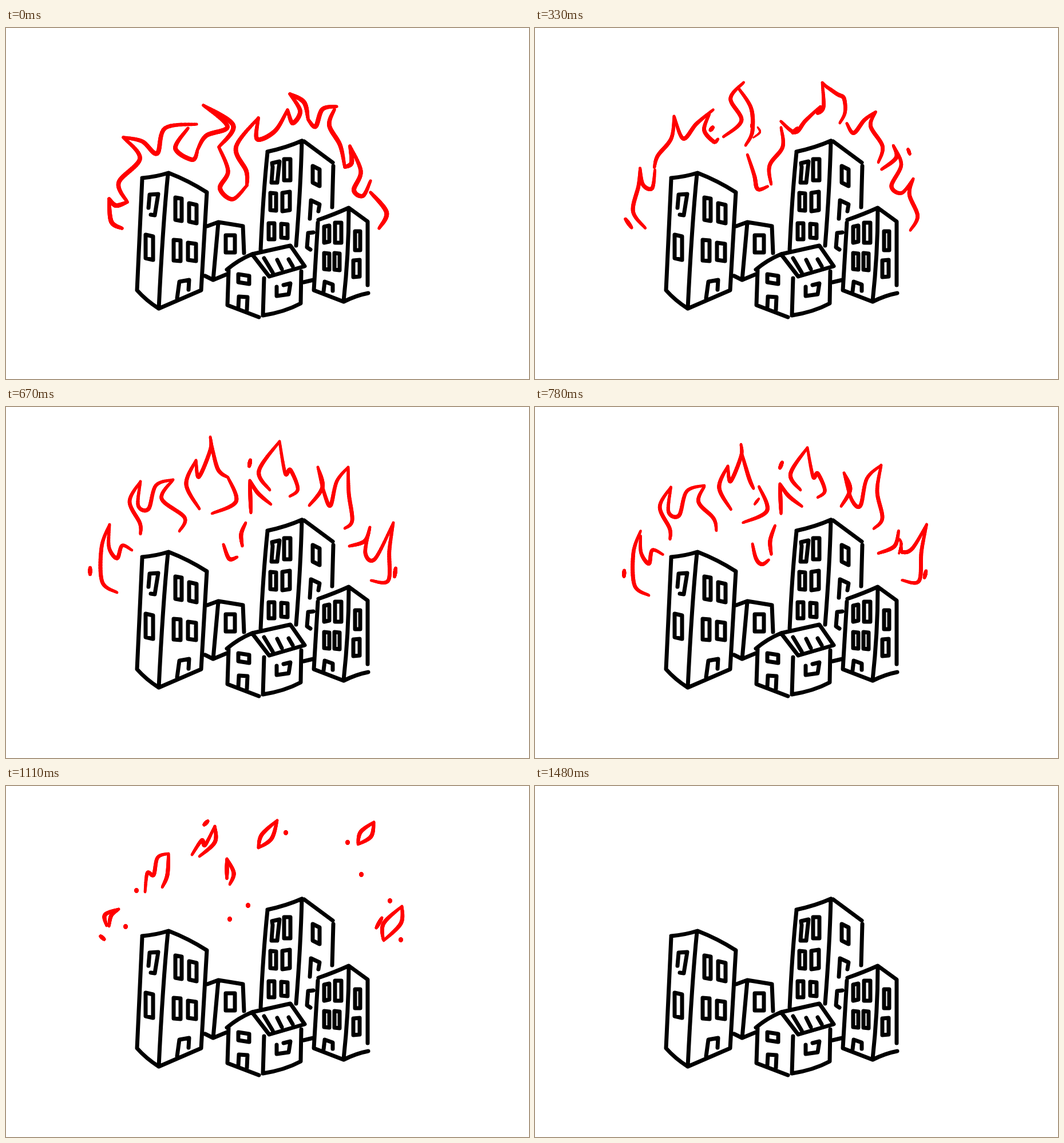
These frames come from a looping animation (914x613 px, 1970 ms). An HTML page with a canvas:

```html
<!DOCTYPE html>
<html lang="en">
<head>
<meta charset="utf-8">
<title>Burning city</title>
<style>
html, body { margin: 0; width: 100%; height: 100%; overflow: hidden; background: #fff; }
canvas { display: block; }
</style>
</head>
<body>
<canvas id="stage" width="914" height="613"></canvas>
<script>
const ctx = document.getElementById('stage').getContext('2d');
const LOOP = 1970, SAMPLES = 40;
const ink = new Path2D();

function line(d) { ink.addPath(new Path2D(d)); }

function pane(x, y, w, h, slope) {
  line(`M${x} ${y}l${w} ${slope}v${h}l${-w} ${-slope}z`);
}

function leftTower() {
  line('M238 262Q262 260 284 253Q320 267 351 287L341 458L267 490Q245 476 229 458L238 264M283 255Q274 345 267 490');
  line('M249 314L251 291L266 290L260 327L253 326M299 472L303 443L320 440L319 457');
  pane(244, 361, 13, 41, 3);
  pane(296, 296, 11, 39, 2);
  pane(320, 306, 13, 32, 3);
  pane(293, 370, 12, 36, 1);
  pane(318, 375, 14, 30, 2);
}

function backBlock() {
  line('M352 346L371 339L414 346L416 393M371 340L362 440M348 433L362 440L386 430');
  pane(384, 362, 16, 30, 0);
}

function tallTower() {
  line('M457 216Q490 209 517 197Q515 280 507 380M457 217Q449 295 445 388M521 198L571 235M572 241L570 313M520 444L537 440');
  line('M466 243L465 236L478 233L474 270L464 270L466 243M531 333L533 301L548 308L546 320M537 357L528 358L526 383L532 387');
  pane(486, 229, 11, 37, 0);
  pane(462, 288, 10, 30, 1);
  pane(483, 288, 13, 32, -2);
  pane(459, 341, 10, 28, 0);
  pane(481, 342, 11, 24, 1);
  pane(536, 241, 12, 29, 6);
}

function house() {
  line('M386 422Q406 405 430 395L497 380L522 416L460 434L430 395M451 402L466 427M474 405L482 421M494 404L501 416');
  line('M389 423L387 484L442 505M451 437L449 502Q487 496 515 481L516 425');
  line('M485 449L497 446L494 465L473 468L473 452M406 488L407 469L422 470L421 492');
  pane(406, 430, 19, 14, 3);
}

function rightBlock() {
  line('M546 335Q575 325 599 314L632 338L632 449M545 340L538 458L590 478Q612 467 633 463M599 316Q599 395 590 477');
  line('M555 460L557 443L571 448L571 459');
  pane(556, 347, 9, 28, -2);
  pane(575, 340, 11, 35, 0);
  pane(556, 393, 9, 28, 1);
  pane(574, 393, 9, 29, 1);
  pane(610, 355, 9, 33, 0);
  pane(607, 406, 11, 29, -1);
}

function mix(a, b, t) { return a + (b - a) * t; }

function spline(p0, p1, p2, p3, t) {
  return p1 + t / 2 * (p2 - p0 + t * (2 * p0 - 5 * p1 + 4 * p2 - p3 + t * (3 * (p1 - p2) + p3 - p0)));
}

// A tapered brush curve through a few points
function sample(xy, width) {
  const last = xy.length / 2 - 1;
  return Array.from({ length: SAMPLES + 1 }, (_, k) => {
    const u = k / SAMPLES, i = Math.min(last - 1, Math.floor(u * last));
    const at = axis => spline(...[-1, 0, 1, 2].map(d => xy[2 * Math.max(0, Math.min(last, i + d)) + axis]), u * last - i);
    return [at(0), at(1), width * (.65 + .35 * Math.sin(Math.PI * u))];
  });
}

// Turns and scales a curve so that it spans new ends
function refit(curve, [x0, y0, x1, y1]) {
  const [ax, ay] = curve[0], [bx, by] = curve[SAMPLES];
  const dx = bx - ax, dy = by - ay, ex = x1 - x0, ey = y1 - y0, d = dx * dx + dy * dy;
  const c = (ex * dx + ey * dy) / d, s = (ey * dx - ex * dy) / d;
  return curve.map(([x, y, w]) => [x0 + c * (x - ax) - s * (y - ay), y0 + s * (x - ax) + c * (y - ay), w]);
}

// '~' goes on from the end of the stroke before, '=' keeps the earlier shape between new ends
function pose(width, strokes, earlier) {
  const curves = {};
  let end = [];
  for (const [key, text] of Object.entries(strokes)) {
    const xy = text.match(/\d+/g).map(Number);
    if (text[0] === '~') xy.unshift(...end);
    if (xy.length === 2) xy.push(xy[0], xy[1] + 3);
    end = xy.slice(-2);
    curves[key] = text[0] === '=' ? refit(earlier[key], xy) : sample(xy, width);
  }
  return curves;
}

const low = pose(8, {
  a: '203 350 184 338 180 298',
  b: '~192 310 212 304',
  c: '~197 270 234 228 205 191',
  d: '~238 198 264 219 278 175 333 168',
  e: '318 175 296 210 326 230 335 212',
  f: '~350 188 387 172 345 135',
  h: '~397 170 372 208',
  j: '~388 250 374 280 396 299 421 275',
  k: '~420 250 402 208 441 157',
  l: '~439 194 470 180 492 143',
  m: '~501 166 514 145 496 115',
  n: '~521 130 528 160',
  o: '~541 172 553 142 578 137',
  p: '574 142 565 170 584 205 592 243',
  q: '~604 235 601 206',
  r: '~620 250 608 283 624 293 637 267',
  s: '637 287 665 322 652 350'
});

const rising = pose(7.5, {
  a: '202 359 175 330 185 285 179 264',
  b: '~188 291 203 293 200 265',
  c: '~208 242 240 205 242 155',
  d: '~262 203 287 172 320 147',
  e: '310 158 298 192 322 210 332 190',
  f: '~372 160 346 120 368 95',
  h: '355 103 390 148 390 192 365 215',
  j: '~384 262 390 289 410 280',
  k: '~405 245 436 208 428 163',
  l: '~456 185 475 155 508 122',
  m: '~502 147 526 143 508 96',
  n: '~552 115 540 165',
  o: '~549 187 572 172 594 162',
  p: '~580 182 606 215 604 243',
  q: '~633 222 622 202',
  r: '~640 240 618 278 636 292 661 265',
  s: '~649 290 664 330 652 357',
  u: '156 326 167 346',
  v: '467 138 480 124',
  w: '651 209 656 223',
  x: '345 151 338 158'
});

const split = pose(6.5, {
  a: '174 330 164 300 173 255 193 206',
  b: '~190 238 208 253 229 213',
  c: '226 200 229 178 245 152',
  d: '~253 173 272 158 294 134',
  e: '~290 160 295 202',
  f: '324 190 338 165 333 130 358 95',
  h: '356 108 354 138 374 185',
  i: '381 155 393 182 358 211',
  z: '376 182 381 155',
  j: '384 234 384 262 400 270',
  k: '418 258 422 218 434 195',
  l: '433 163 458 180 480 168',
  m: '~478 150 460 125 490 94',
  n: '~486 112 494 130 515 125 531 152 518 168',
  o: '555 170 573 176 583 138 598 115',
  p: '~600 150 610 190 592 218',
  q: '609 255 628 235 635 212',
  r: '~640 236 633 272 651 280 661 260',
  s: '~665 292 678 325 664 346',
  u: '162 348 173 355',
  v: '416 275',
  x: '242 218'
});

const high = pose(7, {
  a: '194 324 168 305 167 245 181 205',
  b: '~180 245 194 264 203 242 220 250',
  c: '235 222 234 203 216 165 235 130',
  d: '~231 172 249 178 262 137 292 127',
  e: '~272 160 312 193 303 217',
  f: '338 178 315 135 332 93',
  g: '~337 122 357 75 357 52',
  h: '358 60 370 108 388 123',
  i: '~402 165 360 186',
  j: '380 240 390 265 404 262',
  k: '413 243 411 222 419 202',
  t: '428 185 426 128',
  l: '~440 150 463 170',
  m: '461 145 442 112 478 60',
  n: '~488 116 497 110 510 143 496 156',
  y: '530 172 553 140 545 105',
  o: '~556 150 567 172 578 130 598 105',
  p: '~599 150 605 198 592 212',
  q: '600 243 627 234 636 210',
  r: '~628 255 645 265 677 202',
  s: '~670 250 668 303 638 303',
  u: '147 280 147 293',
  v: '425 104 427 92',
  w: '681 281 679 297'
});

const sinking = pose(7, {
  a: '=204 334 188 228',
  b: '188 245 191 265 204 283 207 258 227 265',
  c: '=237 240 240 150',
  d: '=240 150 300 147',
  e: '300 150 302 182 331 215',
  f: '=347 180 342 113',
  g: '=342 113 363 78',
  h: '363 97 378 140 376 162',
  i: '=395 155 367 218',
  z: '380 175 395 155',
  j: '380 238 386 270 400 283 413 272',
  k: '~411 245 420 212',
  t: '=432 188 430 140',
  l: '=430 140 470 177',
  m: '=467 145 474 82',
  n: '=474 82 492 160',
  y: '=540 175 535 125',
  o: '535 125 550 172 570 173 582 120 612 98',
  p: '~597 145 609 190 592 213',
  q: '=600 268 635 222',
  x: '~640 240 632 272',
  r: '643 272 665 240 692 208',
  s: '=692 208 645 302',
  u: '165 290 164 300',
  v: '431 110 437 100',
  w: '686 291 682 300'
}, high);

const sparks = pose(7, {
  a: '176 244 173 225 197 215',
  b: '~184 226 180 245',
  d: '243 185 247 152 258 155 265 125 284 118',
  e: '~282 155 273 177',
  g: '325 120 342 95 348 103 365 70',
  h: '~365 98 338 123',
  i: '386 127 398 152 391 172',
  z: '386 162 386 127',
  m: '441 108 447 85 474 60',
  n: '~464 92 441 108',
  o: '615 100 620 80 643 63',
  p: '~638 88 615 102',
  q: '647 248 657 230',
  r: '659 268 660 240 692 210',
  s: '~690 240 660 270',
  j: '391 231',
  k: '423 207',
  t: '489 80',
  y: '597 97',
  u: '165 262 172 268',
  v: '346 68 353 61',
  w: '690 267',
  x: '671 199',
  A: '228 181',
  B: '621 153',
  C: '209 244'
});

const poses = [low, rising, split, high, sinking, sparks, {}];

function shrink(stroke, k) {
  const [cx, cy] = stroke[SAMPLES / 2];
  return stroke.map(([x, y, w]) => [mix(cx, x, k), mix(cy, y, k), w * Math.sqrt(k)]);
}

function brush(stroke) {
  for (let i = 1; i < stroke.length; i++) {
    const [x0, y0] = stroke[i - 1], [x, y, w] = stroke[i];
    ctx.lineWidth = w;
    ctx.beginPath();
    ctx.moveTo(x0, y0);
    ctx.lineTo(x, y);
    ctx.stroke();
  }
}

function drawFire(place) {
  const index = Math.floor(place), t = place - index;
  const from = poses[index], to = poses[index + 1] || {};
  for (const key of new Set([...Object.keys(from), ...Object.keys(to)])) {
    const a = from[key], b = to[key];
    if (a && b) brush(a.map((p, i) => p.map((v, j) => mix(v, b[i][j], t))));
    else if (a) brush(shrink(a, 1 - t));
    else if (t > 0) brush(shrink(b, t));
  }
}

// The drawing changes in steps; each start time has its place along the poses
const timeline = [[0, 0], [110, .5], [220, 1], [330, 1.33], [450, 1.67], [560, 2], [670, 3], [780, 3.5],
  [890, 4], [1000, 4.5], [1110, 5], [1220, 5.3], [1310, 5.55], [1400, 5.8], [1480, 6]];

function draw(now) {
  const time = now % LOOP;
  const [, place] = timeline.filter(([start]) => start <= time).pop();
  ctx.fillStyle = '#fff';
  ctx.fillRect(0, 0, 914, 613);
  ctx.lineCap = ctx.lineJoin = 'round';
  ctx.strokeStyle = '#f00';
  drawFire(place);
  ctx.strokeStyle = '#000';
  ctx.lineWidth = 7;
  ctx.stroke(ink);
}

for (const build of [leftTower, backBlock, tallTower, house, rightBlock]) build();

const began = performance.now();
function tick() {
  draw(Math.max(0, performance.now() - began));
  requestAnimationFrame(tick);
}
tick();
</script>
</body>
</html>
```
